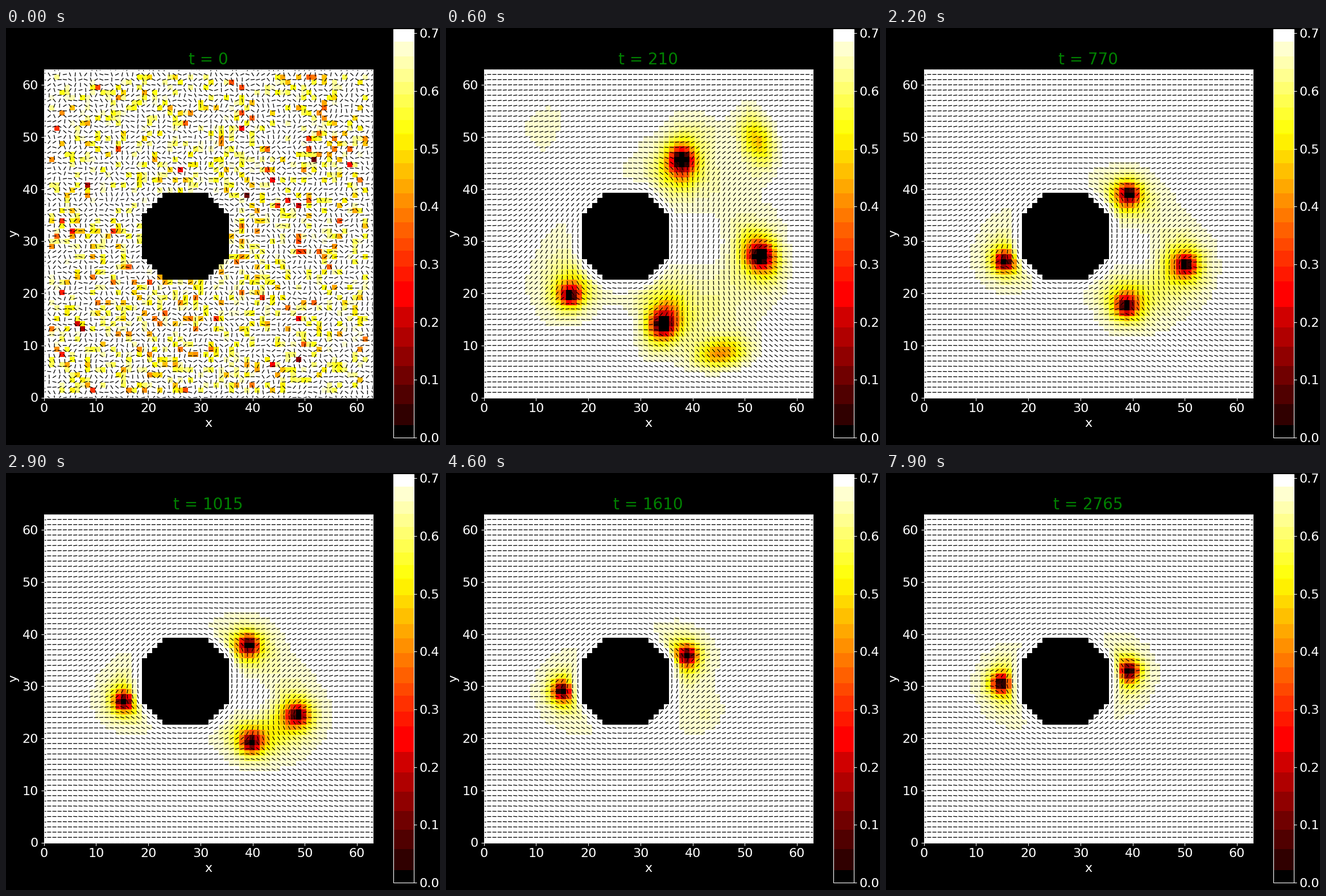
A matplotlib script for the animation above (8000 ms loop, 763 by 734 pixels).

```python
import numpy as np
import matplotlib.pyplot as plt
from matplotlib.animation import FuncAnimation
from matplotlib.collections import LineCollection
from matplotlib.colors import ListedColormap

W, H, DPI = 763, 734, 100
FRAMES, STEP = 80, 35
N = 64
S0 = 2 ** -0.5           # bulk order
XI = 2.5                 # defect core size, in cells
CENTRE = 27 + 31j        # colloid
RADIUS = 8.7
PAIR_END = 38            # when the long-lived pair annihilates
DASH = 7 / 9.18

plt.style.use("dark_background")
plt.rcParams.update({"font.family": "DejaVu Sans", "font.size": 16,
                     "axes.titlesize": 20})

J, I = np.mgrid[0:N, 0:N]
Z = I + 1j * J - CENTRE
DISC = np.abs(Z) < 9
ZS = Z + 1e-3 * (1 + 1j)
R = np.abs(ZS)


def smooth(x):
    x = np.clip(x, 0, 1)
    return x * x * (3 - 2 * x)


EDGE = smooth(np.minimum.reduce([I, J, N - 1 - I, N - 1 - J]) / 8)
SHELL = smooth((R - 9) / 2.8)
RING = 0.25 * (9 / np.maximum(R, 9)) ** 5
SPREAD = np.clip(np.log(32 / R) / np.log(32 / RADIUS), 0, 1)

# Key poses (frame, x, y) of the two defects that stay
LEFT = np.array([(0, 17, 16.5), (6, 16.2, 19.4), (22, 15.1, 26), (36, 14.8, 28),
                 (46, 14.7, 29.1), (63, 14.6, 29.9), (79, 14.5, 30.6)])
UPPER = np.array([(0, 37.3, 49.5), (6, 38, 46), (22, 39.4, 39.3), (36, 39.4, 37.1),
                  (46, 39.1, 36.1), (63, 39.2, 33.9), (79, 39.4, 33)])
PAIR = np.array([(0, 43.4, 20.2), (6, 43.75, 20.5), (22, 44.65, 21.4),
                 (36, 44.1, 22), (38, 43.8, 22.2)])
# Early stretch direction of upper, outer and lower defect
STRETCH = [1.57, -0.95, 1.1]


def follow(keys, f):
    u = np.sqrt(f)
    t = np.sqrt(keys[:, 0])
    return np.interp(u, t, keys[:, 1]) + 1j * np.interp(u, t, keys[:, 2])


def make_pairs():
    """Short-lived defect pairs: (middle, direction, end frame)."""
    rng = np.random.default_rng(12)
    pairs = [(52.7 + 49.6j, 1.85, 5.2), (45.6 + 8.1j, 0.2, 5.45)]
    while len(pairs) < 26:
        x, y = rng.uniform(8, 56, 2)
        angle, end = rng.uniform(0, 2 * np.pi), 1.2 + 2.2 * rng.random() ** 1.5
        if abs(x + 1j * y - CENTRE) > 14:
            pairs.append((x + 1j * y, angle, end))
    return pairs


PAIRS = make_pairs()


def dip(mid, angle, age, tau, amp=0.7):
    """Fading oval patch of low order."""
    d = (Z + CENTRE - mid) * np.exp(-1j * angle)
    return amp * np.exp(-age / tau - (d.real / 3.2) ** 2 / 2 - (d.imag / 2) ** 2 / 2)


def defects(f):
    """Positions and signs of all half-charge defects, lasting ones first."""
    found = [(follow(LEFT, f), -1), (follow(UPPER, f), -1)]
    if f < PAIR_END:
        sep = np.sqrt(np.interp(f, [0, 6, 22, 36, 38], [680, 541, 199, 24, 0]))
        half = sep / 2 * np.exp(1j * np.interp(f, [22, 36], [0.615, 0.47]))
        mid = follow(PAIR, f)
        found += [(mid + half, 1), (mid - half, -1)]
    for mid, angle, end in PAIRS:
        if f < end:
            half = np.sqrt(22 * (end - f)) / 2 * np.exp(1j * angle)
            found += [(mid + half, 1), (mid - half, -1)]
    return found


def noise():
    """Disordered start."""
    rng = np.random.default_rng(5)
    angle = rng.uniform(0, np.pi, (N, N))
    low = (rng.random((N, N)) < 0.3) & (EDGE > 0)
    order = S0 - low * np.minimum(rng.gamma(2, 0.075, (N, N)), 0.6)
    return np.where(DISC, 0, order), angle


def state(f):
    """Order parameter and director angle on the grid."""
    if f == 0:
        return noise()

    phase = 4 * np.angle(ZS)
    grad = 4 / ZS
    twist = np.pi
    found = defects(f)
    for pos, sign in found:
        a = pos - CENTRE
        if abs(a) < RADIUS + 1:
            a *= (RADIUS + 1) / abs(a)
        for p in (a, RADIUS ** 2 / np.conj(a)):
            phase = phase + sign * np.angle(ZS - p)
            grad = grad + sign / (ZS - p)
        twist -= sign * np.angle(a)
    twist = np.angle(np.exp(1j * twist))
    field = np.exp(1j * (phase + twist * SPREAD))
    angle = np.angle(field * EDGE + 1 - EDGE) / 2

    g = XI * np.maximum(np.abs(grad) - RING, 0)
    loss = 1 - (1 + g * g / 4) ** -2
    for mid, direction, end in PAIRS:
        if f >= end:
            loss = loss + dip(mid, direction, f - end, 1)
    if f < PAIR_END:
        for (pos, _), direction in zip(found[1:4], STRETCH):
            loss = loss + dip(pos, direction, f, 8, 0.6)
    else:
        loss = loss + dip(42.5 + 24j, 0.7, f - PAIR_END, 3.2)
    order = S0 * np.clip(1 - loss * SHELL * EDGE, 0, 1)
    return np.where(DISC, 0, order), angle


def banded_hot():
    """The hot colour map in coarse steps per channel."""
    rgb = np.round(plt.get_cmap("hot")(np.linspace(0, 1, 1024))[:, :3] * 255)
    r, g, b = rgb.T
    r = np.where(r < 32, 0, np.where(r >= 224, 255, r // 32 * 32 + 16))
    g = np.minimum(np.round(g / 24) * 24, 255)
    g = np.where(g >= 250, 255, g)
    b = np.where(b >= 224, 255, np.where(b > 0, b // 32 * 32 + 16, 0))
    return ListedColormap(np.stack([r, g, b], 1) / 255)


def box(x0, y0, x1, y1):
    return [x0 / W, 1 - y1 / H, (x1 - x0) / W, (y1 - y0) / H]


def dashes(angle):
    d = DASH / 2 * np.stack([np.cos(angle), np.sin(angle)], -1).reshape(-1, 2)
    c = np.stack([I, J], -1).reshape(-1, 2)
    return np.stack([c - d, c + d], 1)


fig = plt.figure(figsize=(W / DPI, H / DPI), dpi=DPI, facecolor="black")
ax = fig.add_axes(box(66.7, 72.5, 644.7, 650.5))
image = ax.imshow(np.zeros((N, N)), cmap=banded_hot(), vmin=0, vmax=S0,
                  origin="lower", extent=[0, 63, 0, 63], aspect="auto",
                  interpolation="nearest")
lines = LineCollection(dashes(np.zeros((N, N))), colors="black",
                       linewidths=0.95, capstyle="butt")
ax.add_collection(lines)
ax.set(xlim=(0, 63), ylim=(0, 63), xlabel="x", ylabel="y")
ax.set_xticks(range(0, 61, 10))
ax.set_yticks(range(0, 61, 10))
title = ax.set_title("t = 0", color="green")

bar = fig.colorbar(image, cax=fig.add_axes(box(681, 2, 717, 721)))
bar.set_ticks(np.arange(8) / 10)


def update(f):
    order, angle = state(f)
    image.set_data(order)
    lines.set_segments(dashes(angle))
    title.set_text(f"t = {f * STEP}")
    return image, lines, title


anim = FuncAnimation(fig, update, frames=FRAMES, interval=100,
                     repeat=True, repeat_delay=0, blit=False)
plt.show()
```
